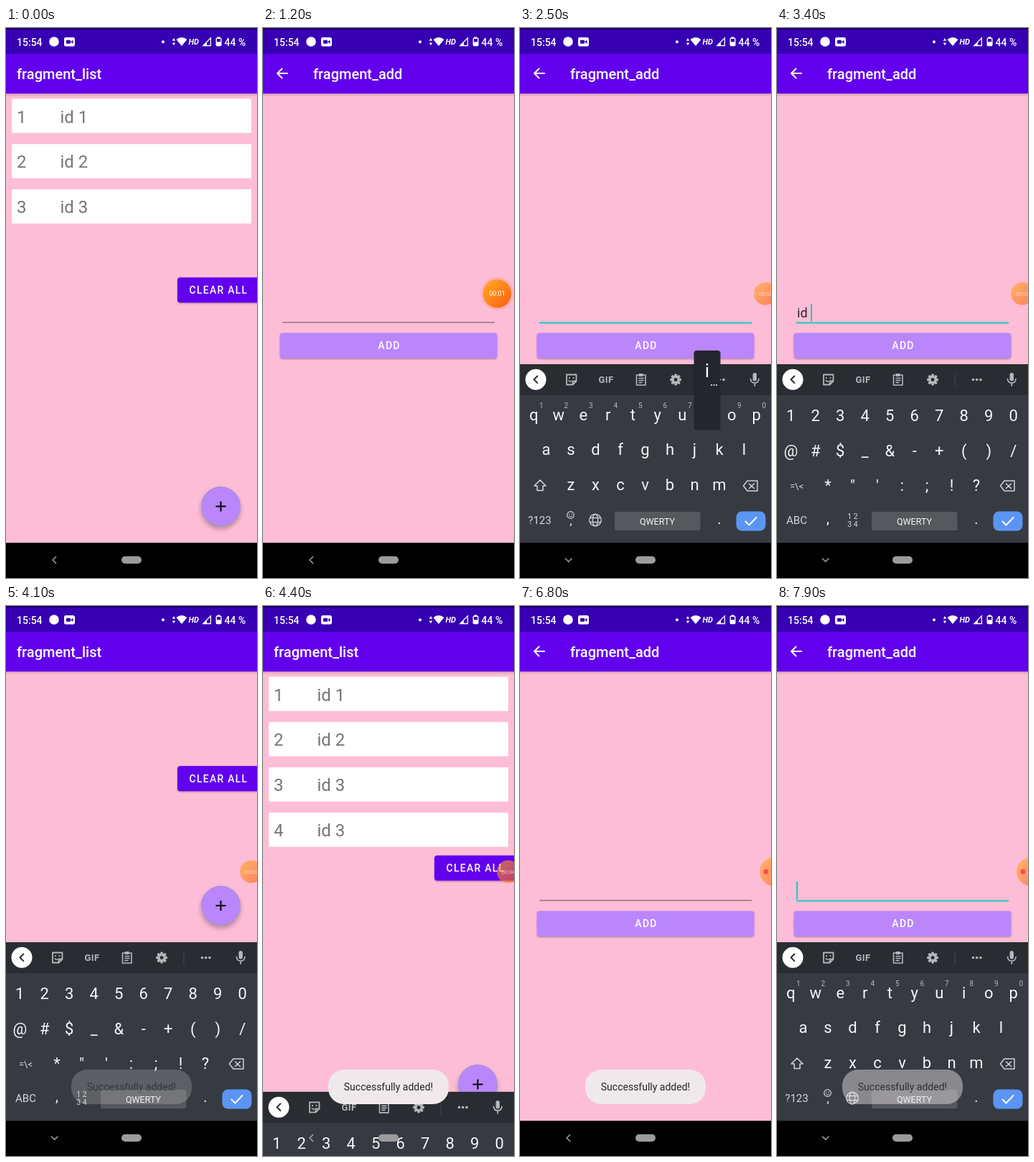
Write an HTML page that moves like this. It is 350 px wide and 764 px high and loops after 8000 ms.

```html
<!DOCTYPE html>
<html lang="en">
<head>
<meta charset="utf-8">
<title>List and add screens</title>
<style>
html, body { margin: 0; width: 100%; height: 100%; overflow: hidden; background: #000; }
svg { display: block; width: 350px; height: 764px; font-family: Roboto, "Noto Sans", sans-serif; }
text { white-space: pre; }
.mid { text-anchor: middle; }
.med { font-weight: 500; }
.line { fill: none; stroke-linecap: round; stroke-linejoin: round; }
</style>
</head>
<body>
<svg id="stage" viewBox="0 0 350 764" xmlns="http://www.w3.org/2000/svg"></svg>
<script>
const LOOP = 8000;
const PURPLE = '#6200ee', LILAC = '#bb86fc', TEAL = '#14cfc0', GREY = '#b4b7bb';

const esc = s => s.replace(/&/g, '&amp;').replace(/</g, '&lt;');
const text = (x, y, size, fill, s, attrs = '') =>
  `<text x="${x}" y="${y}" font-size="${size}" fill="${fill}" ${attrs}>${esc(s)}</text>`;
const mid = (x, y, size, fill, s, attrs = '') => text(x, y, size, fill, s, `text-anchor="middle" ${attrs}`);
const rect = (x, y, w, h, fill, r = 0, attrs = '') =>
  `<rect x="${x}" y="${y}" width="${w}" height="${h}" rx="${r}" fill="${fill}" ${attrs}/>`;
const circle = (x, y, r, fill, attrs = '') => `<circle cx="${x}" cy="${y}" r="${r}" fill="${fill}" ${attrs}/>`;
const path = (d, fill, attrs = '') => `<path d="${d}" fill="${fill}" ${attrs}/>`;
const line = (d, color, w = 2) => `<path class="line" d="${d}" stroke="${color}" stroke-width="${w}"/>`;
const group = (id, body, attrs = '') => `<g id="${id}" ${attrs}>${body}</g>`;

const spaced = 'class="med" letter-spacing="1.25"';

function statusBar() {
  return rect(0, 0, 350, 36, '#3700b3') + rect(0, 0, 350, 2, '#1c0060') +
    text(15, 24.5, 14, '#fff', '15:54', 'class="med"') +
    circle(67, 19, 6.8, '#fff') +
    rect(81, 13, 15, 12.5, '#fff', 2.5) +
    rect(84, 16.8, 6, 5, '#3700b3', 1) + path('M90 19.3L93.5 16.8V21.8Z', '#3700b3') +
    circle(219, 19.3, 2, '#fff') +
    path('M231.8 17.8L234 14L236.2 17.8ZM231.8 20.5L234 24.3L236.2 20.5Z', '#fff') +
    path('M237.5 16Q245 10 252.5 16L245 25Z', '#fff') +
    text(254.5, 23.3, 11, '#fff', 'HD', 'font-weight="700" font-style="italic"') +
    `<path d="M274.8 24.5H285.4V13.8Z" fill="none" stroke="#fff" stroke-width="1.3"/>` +
    path('M275 24.6L280 19.5V24.6Z', '#fff') +
    rect(294.5, 12.4, 4, 2, '#fff') +
    `<rect x="293.3" y="14.2" width="6.6" height="10.4" rx="1" fill="none" stroke="#fff" stroke-width="1.4"/>` +
    rect(293.5, 19.3, 6.2, 5, '#fff') +
    text(304.5, 24.5, 14, '#fff', '44 %', 'class="med"');
}

function appBar() {
  return rect(0, 91, 350, 4, 'url(#edge)') + rect(0, 36, 350, 55, PURPLE) +
    group('listBar', text(15, 71, 20, '#fff', 'fragment_list', 'class="med"')) +
    group('addBar', line('M34 63H20.5M26.5 56.5L20 63L26.5 69.5', '#fff') +
      text(70, 71, 20, '#fff', 'fragment_add', 'class="med"'));
}

function row(n, label) {
  const y = 98.3 + 62.9 * (n - 1);
  return rect(8, y, 334, 47.5, '#fff') +
    text(15, y + 33.2, 24, '#757575', String(n)) + text(75.5, y + 33.2, 24, '#757575', label);
}

function listScreen() {
  return group('rows', row(1, 'id 1') + row(2, 'id 2') + row(3, 'id 3') + group('row4', row(4, 'id 3'))) +
    group('clear', rect(239, 346.5, 115, 35, PURPLE, 4, 'filter="url(#low)"') +
      text(255.5, 369, 14, '#fff', 'CLEAR ALL', spaced)) +
    group('fab', circle(299.5, 664.5, 27.3, LILAC, 'filter="url(#high)"') +
      circle(299.5, 664.5, 27, 'none', 'stroke="#9a95cf" stroke-width="1"') +
      circle(299.5, 664.5, 27, '#fff', 'id="fabTap"') +
      path('M292.5 663.5H298.5V657.5H300.5V663.5H306.5V665.5H300.5V671.5H298.5V665.5H292.5Z', '#000'));
}

function addScreen() {
  return rect(27, 408.5, 296, 1, '#6a4c5d', 0, 'id="idle"') +
    rect(27, 408.5, 296, 2, TEAL, 0, 'id="focus"') +
    text(28, 402, 18, '#2b2226', '', 'id="field"') +
    rect(27, 383, 2, 24.5, TEAL, 0, 'id="caret"') +
    rect(23.5, 423.5, 303, 35.5, LILAC, 4, 'filter="url(#low)"') +
    rect(23.5, 423.5, 303, 35.5, '#fff', 4, 'id="addTap"') +
    mid(176, 446, 14, '#fff', 'ADD', spaced);
}

const keyX = i => 19.3 + 34.5 * i;
const keys = (s, x0, y, size = 22) =>
  [...s].map((c, i) => mid(x0 + 34.5 * i, y, size, '#f4f5f6', c)).join('');

function keyboard() {
  const gear = Array.from({ length: 8 }, (_, i) =>
    rect(215.3, 480.6, 3.6, 4, GREY, 1, `transform="rotate(${i * 45} 217.1 488.5)"`)).join('');
  const tools = rect(0, 467, 350, 43, '#292d32') +
    circle(22, 488.3, 14.5, '#fff') + line('M24.3 483.5L19.5 488.3L24.3 493.1', '#292d32') +
    line('M65 481.5H78.5V490.5L73.5 495.5H65ZM73.5 495V490.5H78', GREY, 1.8) +
    circle(69, 486, 1.1, GREY) + circle(74.5, 486, 1.1, GREY) + line('M68 489.5Q70 492 72 490.5', GREY, 1.4) +
    mid(120, 493, 13, GREY, 'GIF', 'font-weight="700" letter-spacing=".4"') +
    line('M162.5 482H175V496H162.5ZM166 486.5H172M166 489.5H172M166 492.5H170', GREY, 1.6) +
    rect(165.7, 480, 6, 4, GREY, 1) +
    gear + `<circle cx="217.1" cy="488.5" r="4.2" fill="none" stroke="${GREY}" stroke-width="3.4"/>` +
    rect(247.5, 480, 1, 18, '#44484d') +
    [273.5, 278.7, 284].map(x => circle(x, 488.5, 1.8, GREY)).join('') +
    rect(324.6, 479, 5.4, 11.5, GREY, 2.7) + line('M321.5 487.5Q322 493 327.3 493T333 487.5M327.3 493.5V497', GREY, 1.7);

  const letters = keys('qwertyuiop', keyX(0), 544.5) +
    [...'1234567890'].map((c, i) => mid(keyX(i) + 10.5, 528, 10, GREY, c)).join('') +
    keys('asdfghjkl', 36.5, 593) + keys('zxcvbnm', 71, 642) +
    line('M28 628L36 636H32V642.5H24V636H20Z', '#d0d2d4', 1.6) +
    mid(27.5, 688.5, 15, '#d5d7d9', '?123') +
    circle(70.5, 676.5, 4.8, 'none', 'stroke="#d0d2d4" stroke-width="1.2"') +
    circle(68.8, 675.3, .8, '#d0d2d4') + circle(72.2, 675.3, .8, '#d0d2d4') +
    line('M68.3 678Q70.5 680.2 72.7 678', '#d0d2d4', 1) +
    mid(71, 690, 16, '#f4f5f6', ',') +
    `<g fill="none" stroke="#c6c9cc" stroke-width="1.4"><circle cx="105" cy="683.5" r="8.3"/>` +
    `<ellipse cx="105" cy="683.5" rx="3.7" ry="8.3"/><path d="M97.5 680.5H112.5M97.5 686.5H112.5"/></g>`;

  const symbols = keys('1234567890', keyX(0), 546) + keys('@#$_&-+()/', keyX(0), 595) +
    keys('*"\':;!?', 71, 643) +
    mid(27.5, 641, 13, '#d5d7d9', '=\\<') + mid(27.5, 689, 15, '#d5d7d9', 'ABC') +
    mid(71, 688, 20, '#f4f5f6', ',') +
    mid(105.5, 682, 10.5, '#d5d7d9', '1 2') + mid(105.5, 693, 10.5, '#d5d7d9', '3 4');

  const common = line('M317 629H331V643H317L311.5 636ZM319.5 633L326.5 639.5M326.5 633L319.5 639.5', '#d0d2d4', 1.5) +
    rect(132, 672, 119.5, 26, '#55585d', 3) + mid(191.5, 690, 12.5, '#f4f5f6', 'QWERTY') +
    mid(278, 689, 20, '#f4f5f6', '.') +
    rect(301.5, 671.5, 41, 27, '#5b95f3', 8) + line('M314.5 685.5L319.5 690.5L329.5 680', '#fff');

  return rect(0, 467, 350, 248, '#373b41') + rect(0, 715, 350, 49, '#000') + tools +
    group('letters', letters) + group('symbols', symbols) + common +
    group('popup', rect(242.5, 448, 37, 110.5, '#23272d', 4) +
      mid(261, 485, 26, '#fff', '', 'id="popChar"') +
      [267, 270.5, 274].map(x => circle(x, 496, 1, '#fff')).join(''));
}

const toast = () => rect(91, 644, 168, 48, '#f0e9ec', 22) + mid(175, 673.3, 14, '#262326', 'Successfully added!');

const bubble = () => circle(0, 0, 23, '#ff7a4a', 'id="halo" opacity=".22"') +
  circle(0, 0, 20, 'url(#sun)', 'id="ball"') +
  mid(0, 3.2, 9, '#fff', '', 'id="clock"') + circle(0, 0, 3.6, '#ff4a55', 'id="rec"');

document.getElementById('stage').innerHTML = `<defs>
  <linearGradient id="edge" x2="0" y2="1"><stop stop-color="#000" stop-opacity=".2"/><stop offset="1" stop-color="#000" stop-opacity="0"/></linearGradient>
  <linearGradient id="sun" x2="1" y2="1"><stop stop-color="#ffae22"/><stop offset="1" stop-color="#ff5a14"/></linearGradient>
  <filter id="low" x="-10%" y="-20%" width="120%" height="150%"><feDropShadow dx="0" dy="1.2" stdDeviation="1" flood-opacity=".3"/></filter>
  <filter id="high" x="-30%" y="-30%" width="160%" height="170%"><feDropShadow dx="0" dy="4" stdDeviation="3.5" flood-opacity=".3"/></filter>
  </defs>` +
  rect(0, 0, 350, 764, '#febdd6') +
  group('list', listScreen()) + group('add', addScreen()) + appBar() + statusBar() +
  rect(0, 715, 350, 49, '#000') + group('keys', keyboard()) + group('toast', toast()) +
  group('back', line('M69.7 734.5L65 739L69.7 743.5', '#a8a8a8', 1.4)) +
  group('down', line('M63.3 737L67.7 741.3L72 737', '#a8a8a8', 1.4)) +
  rect(161, 733.7, 28, 10.3, '#9c9c9c', 5.1) + group('bubble', bubble());

const $ = Object.fromEntries([...document.querySelectorAll('[id]')].map(e => [e.id, e]));

const between = (t, a, b) => t >= a && t < b;
const show = (e, on) => e.setAttribute('display', on ? 'inline' : 'none');
const move = (e, x, y) => e.setAttribute('transform', `translate(${x} ${y})`);
const ramp = (t, a, b) => Math.min(1, Math.max(0, (t - a) / (b - a)));
const easeOut = p => 1 - (1 - p) ** 3;
const lerp = (a, b, p) => a + (b - a) * p;
const at = (steps, t) => steps.filter(s => s[0] <= t).pop()[1];

const TYPED = [[0, ''], [2600, 'i'], [2900, 'id'], [3100, 'id '], [3700, 'id 3'], [4000, '']];
const CLOCK = [[0, '00:00'], [800, '00:01'], [1900, '00:02'], [3100, '00:03'], [4200, '00:04'], [5200, '00:05']];
const CARET = [[0, 0], [1700, 1700], [2600, 2600], [2900, 2900], [3100, 3100], [3700, 3700], [7400, 7400], [7500, 7500]];
const POPUPS = [[2500, 'i', 7, 0], [2800, 'd', 2.49, 49], [3600, '3', 2, 0]];

function render(t) {
  const adding = between(t, 1100, 4000) || t >= 6700;
  const focused = between(t, 1700, 4000) || t >= 7400;
  const typing = between(t, 1900, 4200) || t >= 7500;
  const short = between(t, 4000, 4200);

  show($.list, !adding); show($.listBar, !adding);
  show($.add, adding); show($.addBar, adding);
  show($.rows, !short);
  show($.row4, t >= 4200);
  move($.clear, 0, short ? -124.3 : 0);
  move($.fab, 0, short ? -248.3 : 0);
  $.fabTap.setAttribute('opacity', between(t, 1000, 1100) || between(t, 6600, 6700) ? .24 : 0);
  $.addTap.setAttribute('opacity', between(t, 3900, 4000) ? .24 : 0);

  const value = at(TYPED, t);
  $.field.textContent = value;
  show($.idle, !focused); show($.focus, focused);
  show($.caret, focused && Math.floor((t - at(CARET, t)) / 500) % 2 === 0);
  move($.caret, adding && value ? $.field.getComputedTextLength() + 1 : 0, 0);

  const up = t < 4200 ? easeOut(ramp(t, 1850, 2200))
    : t < 7000 ? 1 - ramp(t, 4150, 4450) ** 2 : easeOut(ramp(t, 7450, 7800));
  show($.keys, up > 0);
  move($.keys, 0, 297 * (1 - up));
  const numeric = between(t, 3400, 5000);
  show($.letters, !numeric); show($.symbols, numeric);
  show($.back, !typing); show($.down, typing);

  const pop = POPUPS.find(p => between(t, p[0], p[0] + 100));
  show($.popup, pop);
  if (pop) {
    $.popChar.textContent = pop[1];
    move($.popup, keyX(pop[2]) - keyX(7), pop[3]);
  }

  $.toast.setAttribute('opacity', ramp(t, 4050, 4300) * (1 - ramp(t, 7790, 7990)));

  // Recorder bubble: pops in, docks small at the edge, then tucks away.
  const dock = easeOut(ramp(t, 1900, 2200)), tuck = easeOut(ramp(t, 6050, 6250));
  const enter = easeOut(ramp(t, 100, 300));
  move($.bubble, lerp(lerp(326.5, 342, dock), 354, tuck), 369);
  $.bubble.setAttribute('opacity', enter);
  $.ball.setAttribute('r', enter * lerp(lerp(19.8, 15.8, dock), 19.8, tuck));
  $.ball.setAttribute('opacity', lerp(1, .62, dock));
  $.halo.setAttribute('opacity', .22 * (1 - dock));
  $.clock.textContent = at(CLOCK, t);
  $.clock.setAttribute('font-size', lerp(9, 7.4, dock));
  $.clock.setAttribute('opacity', lerp(1, .65, dock) * (1 - tuck));
  $.rec.setAttribute('opacity', tuck);
  $.rec.setAttribute('cx', -11 * tuck);
}

const start = performance.now();
function tick() {
  render((performance.now() - start) % LOOP);
  requestAnimationFrame(tick);
}
tick();
</script>
</body>
</html>
```
